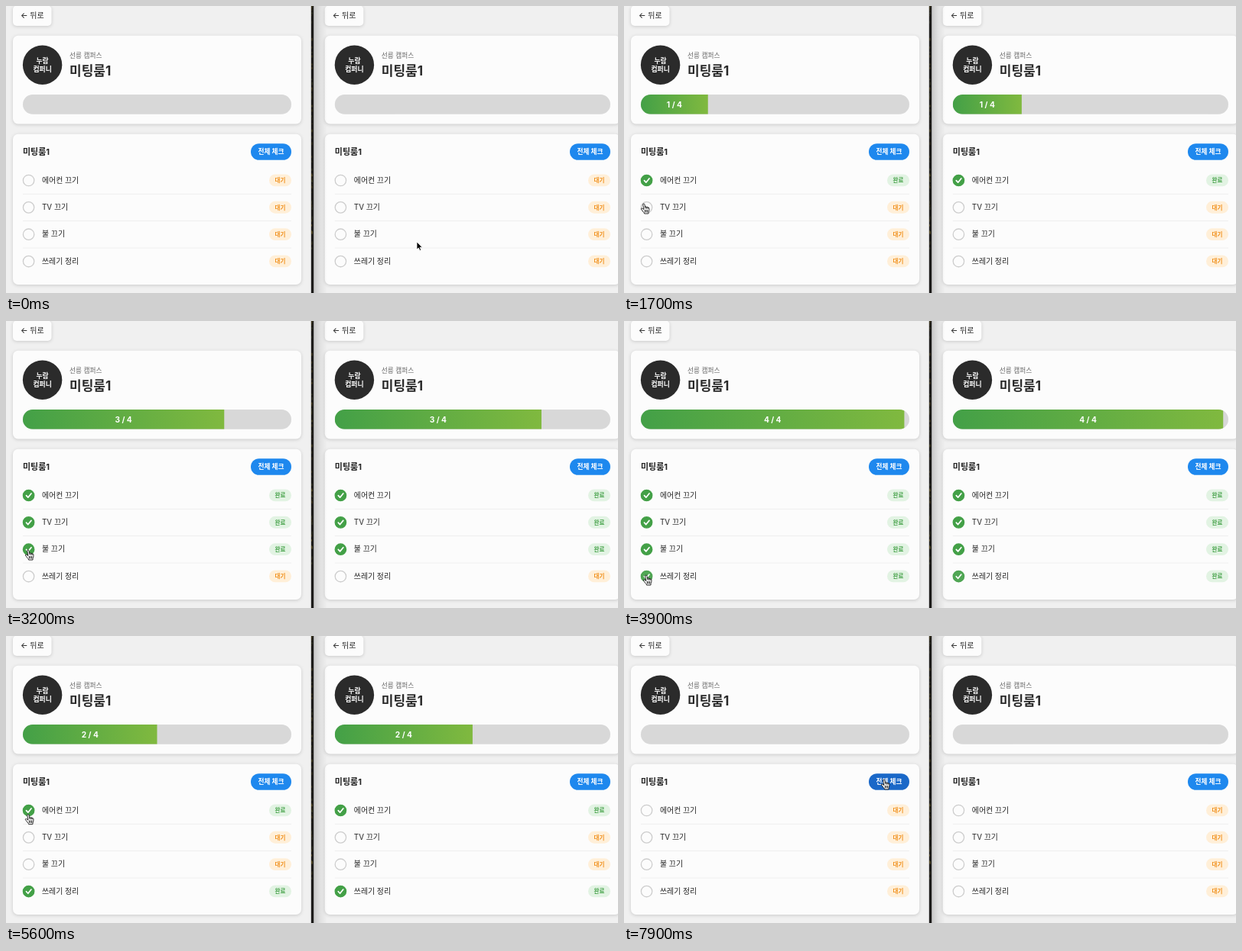
Write an HTML page that moves like this. It is 800 px wide and 376 px high and loops after 8 s.

```html
<!DOCTYPE html>
<html lang="ko">
<head>
<meta charset="utf-8">
<title>Checklist sync</title>
<style>
  html, body { margin: 0; width: 100%; height: 100%; overflow: hidden; background: #f0f0f0; }
  svg { display: block; width: 800px; height: 376px; }
  text { font-family: Inter, 'Noto Sans CJK KR', 'Noto Sans CJK', sans-serif; }
  .card { fill: #fcfcfc; filter: drop-shadow(0 1px 2px rgba(0, 0, 0, .16)); }
</style>
</head>
<body>
<svg id="stage" viewBox="0 0 800 376">
  <defs>
    <linearGradient id="green">
      <stop offset="0" stop-color="#43a047"/>
      <stop offset="1" stop-color="#80b93f"/>
    </linearGradient>
    <linearGradient id="shade">
      <stop offset="0" stop-color="#000" stop-opacity=".17"/>
      <stop offset=".5" stop-color="#000" stop-opacity=".06"/>
      <stop offset="1" stop-color="#000" stop-opacity="0"/>
    </linearGradient>
  </defs>
  <rect width="800" height="376" fill="#f0f0f0"/>
  <g id="panels"></g>
  <g id="divider"></g>
  <g id="cursor">
    <path id="arrow" d="M0 0V10L2.3 7.9L3.9 11.4L5.6 10.6L4.1 7.2H7.2Z"
      fill="#000" stroke="#fff" stroke-width=".8" stroke-linejoin="round"/>
    <g id="hand" stroke="#111" stroke-width=".9" stroke-linejoin="round" stroke-linecap="round">
      <path fill="#fff" d="M-1.2 .7Q-.9 -.3 0 0Q.8 .2 1 1.2L1.5 4Q2.6 3.3 3.2 4.4Q4.4 3.8 5 4.9Q6.6 4.5 6.9 6.2Q7.2 8.6 6.2 10.4L5.9 13H.6L.2 11.8Q-1.2 10.4 -2.2 8.8L-3.6 7Q-3.7 5.8 -2.5 5.9L-.4 7.3Z"/>
      <path fill="none" d="M1.5 4L1.8 6M3.2 4.4L3.5 6.2M5 4.9L5.1 6.4M1.3 8.3V11M3 8.3V11M4.7 8.3V11"/>
    </g>
  </g>
</svg>
<script>
const LOOP = 8000, FADE = 300;
const items = ['에어컨 끄기', 'TV 끄기', '불 끄기', '쓰레기 정리'];
const rowY = i => 228.5 + i * 35.35;

// [time, item]: each click toggles the item
const clicks = [[1000, 0], [1850, 1], [2700, 2], [3700, 3], [4567, 2], [5050, 1], [5700, 0], [6800, 3]];

// [time, x, y] of the pointer tip
const path = [
  [0, 537, 309], [500, 42, 236], [700, 40, 235], [900, 29, 226], [1250, 29, 226],
  [1550, 26, 259], [1950, 26, 259], [2350, 28, 296], [2800, 28, 296], [3200, 29, 300],
  [3320, 30, 347], [3550, 29, 333], [3950, 29, 333], [4400, 30, 291], [4650, 30, 291],
  [4900, 28, 259], [5150, 28, 259], [5450, 29, 234], [5800, 29, 233], [6200, 32, 353],
  [6420, 32, 353], [6650, 29, 332], [7000, 29, 332], [7600, 340, 188], [8000, 340, 188]
];

const $ = id => document.getElementById(id);
const clamp = v => Math.max(0, Math.min(1, v));
const mix = (a, b, k) => a + (b - a) * k;

function add(parent, tag, attrs = {}, label) {
  const el = document.createElementNS('http://www.w3.org/2000/svg', tag);
  set(el, attrs);
  if (label) el.textContent = label;
  parent.appendChild(el);
  return el;
}
function set(el, attrs) {
  for (const k in attrs) el.setAttribute(k, attrs[k]);
}
function box(parent, x, y, width, height, rx, attrs) {
  return add(parent, 'rect', { x, y, width, height, rx, ...attrs });
}
// Text placed by its vertical middle
function write(parent, label, x, cy, size, weight, fill, anchor = 'start') {
  return add(parent, 'text', {
    x, y: cy + size * .37, 'font-size': size, 'font-weight': weight, fill, 'text-anchor': anchor
  }, label);
}

function bezier(a, b, s) {
  return 3 * a * s * (1 - s) ** 2 + 3 * b * s * s * (1 - s) + s ** 3;
}
function ease(k) {
  if (k <= 0 || k >= 1) return clamp(k);
  let lo = 0, hi = 1;
  for (let i = 0; i < 24; i++) {
    const m = (lo + hi) / 2;
    if (bezier(.25, .25, m) < k) lo = m; else hi = m;
  }
  return bezier(.1, 1, lo);
}
function blend(a, b, k) {
  return `rgb(${a.map((v, i) => Math.round(mix(v, b[i], k)))})`;
}

function panel(left, width, id) {
  const g = add($('panels'), 'g');
  const x = left + 13, right = left + width - 13, barW = right - x;

  box(g, left, -.5, 50.5, 26.5, 5, { class: 'card' });
  write(g, '← 뒤로', left + 25.3, 12.6, 10, 500, '#222', 'middle');

  box(g, left, 38.8, width, 115.7, 7, { class: 'card' });
  add(g, 'circle', { cx: x + 25.6, cy: 77.2, r: 25.7, fill: '#2b2b2b' });
  write(g, '누람', x + 25.6, 71.6, 8.8, 700, '#fff', 'middle');
  write(g, '컴퍼니', x + 25.6, 82.8, 8.8, 700, '#fff', 'middle');
  write(g, '선릉 캠퍼스', x + 61, 64.5, 8.7, 400, '#666', 'start');
  write(g, '미팅룸1', x + 61, 84.3, 17, 700, '#2a2a2a');

  const track = add(g, 'clipPath', { id: 'track' + id });
  box(track, x, 116, barW, 25.8, 12.9);
  box(g, x, 116, barW, 25.8, 12.9, { fill: '#d8d8d8' });
  const bar = add(g, 'g', { 'clip-path': `url(#track${id})` });
  const fill = box(bar, x, 116, 0, 25.8, 0, { fill: 'url(#green)' });
  const fillClip = add(g, 'clipPath', { id: 'fill' + id });
  const fillMask = box(fillClip, x, 116, 0, 25.8, 0);
  const count = write(add(bar, 'g', { 'clip-path': `url(#fill${id})` }),
    '', x, 128.9, 10.2, 700, '#fff', 'middle');

  box(g, left, 167.8, width, 197.2, 7, { class: 'card' });
  write(g, '미팅룸1', x, 190.8, 11, 700, '#222');
  const button = box(g, right - 53, 180.2, 53, 21.6, 10.8, { fill: '#1e88ee' });
  write(g, '전체 체크', right - 26.5, 191, 8.7, 700, '#fff', 'middle');

  const rows = items.map((name, i) => {
    const y = rowY(i);
    const dot = add(g, 'circle', { cx: x + 7.6, cy: y, r: 7.2, 'stroke-width': 1.3 });
    const tick = add(g, 'path', {
      d: `M${x + 4.5} ${y + .2}l2.3 2.5l4.2 -5.2`, fill: 'none', stroke: '#fff',
      'stroke-width': 1.7, 'stroke-linecap': 'round', 'stroke-linejoin': 'round'
    });
    write(g, name, x + 25, y - .5, 9.9, 400, '#222');
    const pill = box(g, right - 29, y - 8, 29, 15.8, 7.9);
    const state = write(g, '', right - 14.5, y, 7.5, 700, '#000', 'middle');
    if (i < 3) box(g, x, y + 17.4, barW, .8, 0, { fill: '#ececec' });
    return { dot, tick, pill, state };
  });
  return { x, barW, fill, fillMask, count, button, rows };
}

function drawDivider() {
  const g = $('divider');
  box(g, 402, 0, 18, 376, 0, { fill: 'url(#shade)' });
  box(g, 398.8, 0, 3.4, 376, 0, { fill: '#1d1c1a' });
  let seed = 7;
  const rnd = () => (seed = seed * 16807 % 2147483647) / 2147483647;
  for (let i = 0; i < 70; i++) {
    const y = rnd() * 320;
    box(g, 398.9 + rnd() * .8, y, 1, 1 + rnd() * 3, 0, {
      fill: rnd() < .5 ? '#6b5a2a' : '#4a4c30', opacity: .3 + rnd() * .5
    });
  }
}

const panels = [panel(9, 377, 'A'), panel(416.8, 386.2, 'B')];
drawDivider();

function stateAt(t) {
  const on = [0, 0, 0, 0], glow = [0, 0, 0, 0];
  let done = 0, part = 0;
  for (const [at, i] of clicks) {
    if (t < at) break;
    const k = ease((t - at) / FADE);
    on[i] = 1 - on[i];
    glow[i] = mix(1 - on[i], on[i], k);
    const before = done;
    done += on[i] ? 1 : -1;
    part = mix(before, done, k) / 4;
  }
  return { on, glow, done, part };
}

function pointerAt(t) {
  let i = 0;
  while (i < path.length - 2 && path[i + 1][0] <= t) i++;
  const [t0, x0, y0] = path[i], [t1, x1, y1] = path[i + 1];
  const k = clamp((t - t0) / (t1 - t0)), s = k * k * (3 - 2 * k);
  return [mix(x0, x1, s), mix(y0, y1, s)];
}

function draw(t) {
  const { on, glow, done, part } = stateAt(t);
  const [px, py] = pointerAt(t);
  const overButton = px > 320 && px < 373 && py > 180 && py < 202;
  const overRow = px > 22 && px < 373 && py > 211 && py < 352;

  for (const p of panels) {
    const width = p.barW * part;
    set(p.fill, { width });
    set(p.fillMask, { width });
    set(p.count, { x: p.x + width / 2 });
    p.count.textContent = done + ' / 4';
    p.rows.forEach((r, i) => {
      set(r.dot, {
        fill: blend([252, 252, 252], [67, 160, 71], glow[i]),
        stroke: blend([205, 205, 205], [67, 160, 71], glow[i])
      });
      set(r.tick, { opacity: on[i] });
      set(r.pill, { fill: on[i] ? '#e2f3e3' : '#ffefd8' });
      set(r.state, { fill: on[i] ? '#43a047' : '#f0901c' });
      r.state.textContent = on[i] ? '완료' : '대기';
    });
  }
  set(panels[0].button, { fill: overButton ? '#1a68c8' : '#1e88ee' });

  const hand = overButton || overRow;
  set($('cursor'), { transform: `translate(${px} ${py})` });
  set($('hand'), { visibility: hand ? 'visible' : 'hidden' });
  set($('arrow'), { visibility: hand ? 'hidden' : 'visible' });
}

let start;
function tick(now) {
  if (start === undefined) start = now;
  draw((now - start) % LOOP);
  requestAnimationFrame(tick);
}
draw(0);
requestAnimationFrame(tick);
</script>
</body>
</html>
```
